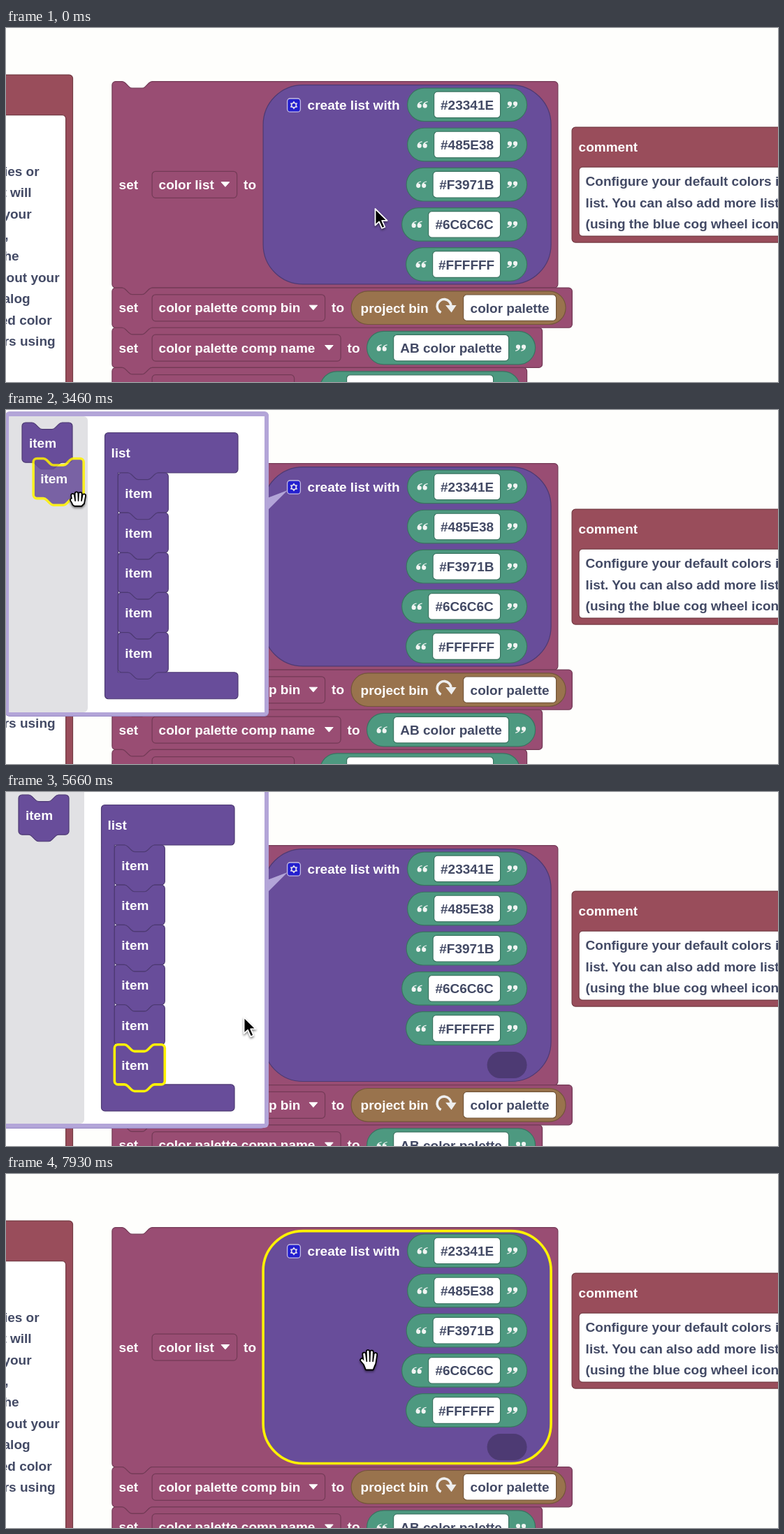
These frames come from a looping animation (1105x507 px, 8 s). An HTML page:

```html
<!DOCTYPE html>
<html lang="en">
<head>
<meta charset="utf-8">
<title>List block mutator</title>
<style>
html, body { margin: 0; width: 100%; height: 100%; overflow: hidden; background: #fefefc; }
svg { display: block; width: 1105px; height: 507px; }
text { font: bold 19px "Liberation Sans", Arial, sans-serif; fill: #fff; }
.ink { fill: #434a65; }
.plum { fill: #994d73; stroke: #733a56; }
.purple { fill: #684d9a; stroke: #4d3a73; }
.green { fill: #4d9980; stroke: #3a7360; }
.brown { fill: #99734d; stroke: #73563a; }
.red { fill: #994d5b; stroke: #733a43; }
.plum, .purple, .green, .brown, .red { stroke-width: 1.2; }
.field { fill: #fff; }
.slot { fill: #4d3a73; }
.mark { fill: #f0f4f2; }
.rim { fill: #b3a5d8; }
.edge { fill: #9686c4; }
.flyout { fill: #e1e1e4; }
.ghost { fill: #c9c9c9; }
.selected { fill: none; stroke: #fff200; stroke-width: 3.6; }
#cursor { filter: drop-shadow(0 2px 1.5px #0007); }
</style>
</head>
<body>
<svg viewBox="0 0 1105 507">
  <defs><clipPath id="inside"><rect id="clipRect"/></clipPath></defs>
  <g id="workspace" transform="translate(-.4 -.4)"></g>
  <g id="icon">
    <rect x="402.6" y="101" width="18.8" height="19.2" rx="4" fill="#1414dc" stroke="#dcd8f4" stroke-width="1.3"/>
    <path id="gear" fill="#fff"/>
    <circle cx="412" cy="110.6" r="2.5" fill="#1414dc"/>
  </g>
  <g id="bubble">
    <g id="frame"></g>
    <g clip-path="url(#inside)">
      <g id="content"></g>
      <g id="dragged"></g>
    </g>
    <circle id="ripple" cx="182" cy="365" fill="none" stroke="#888" stroke-width="3"/>
  </g>
  <g id="cursor"></g>
</svg>
<script>
const LOOP = 8000, ROW = 57.15, GROWTH = 47.6;
const $ = id => document.getElementById(id);

// Shape helpers
const rect = (x, y, w, h, r, cls) =>
  `<rect x="${x}" y="${y}" width="${w}" height="${h}" rx="${r}" class="${cls}"/>`;
const path = (d, cls) => `<path d="${d}" class="${cls}"/>`;
const label = (x, mid, str, cls = '', anchor = 'start') =>
  `<text x="${x}" y="${mid + 6.7}" class="${cls}" text-anchor="${anchor}">${str}</text>`;

const notch = d =>
  `c${2.4 * d} 0 ${3.6 * d} 1.2 ${4.8 * d} 2.4l${4.8 * d} 4.8` +
  `c${1.2 * d} 1.2 ${2.4 * d} 2.4 ${4.8 * d} 2.4h${14.2 * d}` +
  `c${2.4 * d} 0 ${3.6 * d} -1.2 ${4.8 * d} -2.4l${4.8 * d} -4.8` +
  `c${1.2 * d} -1.2 ${2.4 * d} -2.4 ${4.8 * d} -2.4`;
const blockPath = (x, y, w, h) =>
  `M${x} ${y + 5}a5 5 0 0 1 5 -5h9.3${notch(1)}H${x + w - 5}a5 5 0 0 1 5 5V${y + h - 5}` +
  `a5 5 0 0 1 -5 5H${x + 57.3}${notch(-1)}h-9.3a5 5 0 0 1 -5 -5z`;

function quote(x, y, turn) {
  const d = 'M7 0C3 .5 0 3 0 6.4A3.1 3.1 0 1 0 3.1 3.3C3.4 2.2 5 1.5 7 1.2Z';
  return `<g class="mark" transform="translate(${x} ${y}) rotate(${turn}) translate(-7.5 -4.8)">` +
    `<path d="${d}"/><path d="${d}" transform="translate(8 0)"/></g>`;
}
function textPill(left, right, mid, str) {
  return rect(left, mid - 23.8, right - left, 47.6, 23.8, 'green') +
    quote(left + 21.5, mid, 0) + quote(right - 21, mid, 180) +
    rect(left + 38, mid - 18.8, right - left - 76, 37.6, 5, 'green field') +
    label((left + right) / 2, mid + .4, str, 'ink', 'middle');
}
function setter(mid, name, right) {
  return label(162, mid, 'set') + rect(209.5, mid - 19, right - 209.5, 38, 5, 'plum') +
    label(219, mid, name) +
    `<path d="M${right - 22.5} ${mid - 3.6}h11.6l-5.8 6.6z" fill="#fff" stroke="#fff" stroke-linejoin="round"/>` +
    label(right + 9.5, mid, 'to');
}
const item = (x, y, cls = 'purple') => path(blockPath(x, y, 72, ROW), cls) + label(x + 10, y + 29.3, 'item');

function comments() {
  const left = ['libraries or|48', 'it will|37', 'your|37', ',|4', 'the|19', 'without your|77',
    'dialog|35', 'ed color|66', 'colors using|71'];
  const right = ['Configure your default colors in this', 'list. You can also add more list items',
    '(using the blue cog wheel icon)'];
  return rect(-200, 67.5, 295.9, 500, 5, 'red') + rect(-200, 125, 286, 500, 5, 'red field') +
    left.map((line, i) => {
      const [str, x] = line.split('|');
      return label(x, 205.5 + 30.4 * i, str, 'ink', 'end');
    }).join('') +
    rect(810.5, 142.5, 400, 165, 5, 'red') + label(820, 171, 'comment') +
    rect(820.5, 199.5, 400, 99, 5, 'red field') +
    right.map((str, i) => label(830, 220 + 30.4 * i, str, 'ink')).join('');
}

function workspace(grown, selected) {
  const extra = grown ? GROWTH : 0;
  const y = 372.5 + extra;
  const colors = [[575, '#23341E'], [575, '#485E38'], [573.5, '#F3971B'], [567, '#6C6C6C'], [573, '#FFFFFF']];
  const list = cls => rect(368.5, 82, 412, 285.3 + extra, 57, cls);
  return comments() +
    path(blockPath(152.3, 77, 638, 295.5 + extra), 'plum') + setter(224.7 + extra / 2, 'color list', 331) +
    list('purple') + label(432, 111, 'create list with') +
    colors.map(([x, hex], i) => textPill(x, 746, 110.3 + ROW * i, hex)).join('') +
    (grown ? rect(689, 372.5, 57, 38, 19, 'slot') : '') +
    (selected ? list('selected') : '') +
    path(blockPath(152.3, y, 658.5, ROW), 'plum') + setter(y + 28.7, 'color palette comp bin', 457) +
    rect(494.5, y + 4.8, 307, 47.6, 23.8, 'brown') + label(508, y + 29, 'project bin') +
    `<path d="M623 ${y + 35.4}A10 10 0 1 1 637.5 ${y + 26}" fill="none" stroke="#eee" stroke-width="3.6"/>` +
    `<path d="M629.5 ${y + 25}h15.5l-7 10.5z" fill="#eee"/>` +
    rect(655, y + 9.7, 133, 37.6, 5, 'brown field') + label(721.5, y + 28.8, 'color palette', 'ink', 'middle') +
    path(blockPath(152.3, y + ROW, 615.7, ROW), 'plum') +
    setter(y + 86, 'color palette comp name', 479.5) + textPill(517, 758, y + 86, 'AB color palette') +
    path(blockPath(152.3, y + 2 * ROW, 593.7, ROW), 'plum') + setter(y + 143.5, 'color palette tag', 413) +
    textPill(450, 736, y + 143.5, 'color palette');
}

function bubbleFrame(grown) {
  const [x, y, bottom] = grown ? [-6, -12, 481] : [-1, 2, 438];
  return path('M374 126L403 115L374 144z', 'rim') +
    rect(x, y + 1, 377, bottom - y, 6, 'edge') + rect(x, y, 376 - x, bottom - y, 6, 'rim');
}

// "gap" is the slot where the dragged block would land, -1 for none
function bubbleContent(grown, gap) {
  const count = grown || gap >= 0 ? 6 : 5;
  const bottom = 90 + ROW * count;
  const height = grown ? 480 : 424;
  let out = rect(-20, 0, 800, 800, 0, 'field') + rect(-10, 9, 127, height, 6, 'flyout') + item(23, 18) +
    path(`M141.5 37.5a5 5 0 0 1 5 -5H327a5 5 0 0 1 5 5V85a5 5 0 0 1 -5 5H217.6${notch(-1)}H160.3V${bottom}H327` +
      `a5 5 0 0 1 5 5v28a5 5 0 0 1 -5 5H146.5a5 5 0 0 1 -5 -5z`, 'purple') + label(150.5, 61.5, 'list');
  for (let i = 0; i < count; i++) {
    if (i !== gap) out += item(160.3, 90 + ROW * i);
  }
  if (gap >= 0) {
    const y = 90 + ROW * gap;
    out += path(blockPath(160.3, y, 72, ROW), 'ghost') + path(`M160.3 ${y}h14.3${notch(1)}H228`, 'selected');
  }
  if (grown) out += path(blockPath(160.3, 90 + 5 * ROW, 72, ROW), 'selected');
  return out;
}

// Cursors, drawn around the hot spot
function hand(tops, thumb, palm) {
  const fingers = tops.map((top, i) => `M${-6.3 + 5.4 * i} ${top}L${-4.6 + 4.2 * i} 9`).join('');
  const d = `${fingers}M-4 11L${thumb}`;
  const stroke = (color, w) =>
    `<path d="${d}" fill="none" stroke="${color}" stroke-width="${w}" stroke-linecap="round"/>`;
  const body = `M-6 7H9V10L6 ${palm}H-3.5L-6 11z`;
  return `<path d="${body}" stroke="#000" stroke-width="4" stroke-linejoin="round"/>` + stroke('#000', 6.4) +
    stroke('#fff', 2.9) + `<path d="${body}" fill="#fff"/>`;
}
const CURSORS = {
  arrow: '<path d="M.5 1V24.5L6 19.4L10.2 28.8L14.3 27L10.2 17.8H17.6Z" stroke="#fff" stroke-width="1.8" stroke-linejoin="round"/>',
  open: hand([-4, -7.5, -7, -3.5], '-9.5 4.5', 17.5),
  grab: hand([-1.5, -4, -3.5, -1], '-7.5 5', 13)
};

// Monotone Hermite curve through [time, x, y] keys
function follow(keys, t) {
  const last = keys.length - 1;
  if (t <= keys[0][0]) return keys[0].slice(1);
  if (t >= keys[last][0]) return keys[last].slice(1);
  const i = keys.findIndex(key => key[0] > t) - 1;
  const span = keys[i + 1][0] - keys[i][0], u = (t - keys[i][0]) / span;
  return [1, 2].map(axis => {
    const slope = k => k < 0 || k >= last ? 0 :
      (keys[k + 1][axis] - keys[k][axis]) / (keys[k + 1][0] - keys[k][0]);
    const tangent = k => {
      const a = slope(k - 1), b = slope(k);
      return a * b > 0 ? 2 * a * b / (a + b) : 0;
    };
    const p = keys[i][axis], q = keys[i + 1][axis];
    return p + (q - p) * u * u * (3 - 2 * u) +
      span * u * (1 - u) * (tangent(i) * (1 - u) - tangent(i + 1) * u);
  });
}

const POINTER = [
  [730, 528, 258], [1260, 410, 118], [1530, 409, 108], [2360, 409, 108], [2700, 182, 54], [3160, 82, 59],
  [3260, 82, 59], [3900, 204, 389], [4060, 238, 421], [4100, 238, 421], [4330, 217, 421],
  [5130, 217, 421], [5930, 384, 286], [5960, 384, 286], [6430, 407, 131], [6700, 411, 108],
  [7530, 411, 108], [7930, 519, 262]
];
const DRAG = [[3260, 23, 18], [3900, 132, 317], [4060, 179, 380], [4100, 179, 380], [4330, 158, 380]];

const cache = {};
function fill(id, make, ...args) {
  const key = args.join();
  if (cache[id] === key) return;
  cache[id] = key;
  $(id).innerHTML = make(...args);
}
const show = (id, on) => $(id).setAttribute('display', on ? 'inline' : 'none');
const place = (id, x, y) => $(id).setAttribute('transform', `translate(${x} ${y})`);
const set = (id, attrs) => Object.entries(attrs).forEach(([k, v]) => $(id).setAttribute(k, v));
const between = (t, a, b) => t >= a && t < b;

function render(t) {
  const grown = t >= 4660;
  const dragging = between(t, 3160, 4660);
  const gap = between(t, 3830, 3990) ? 4 : between(t, 3990, 4660) ? 5 : -1;
  fill('workspace', workspace, grown, between(t, 1730, 3260) || t >= 7000);

  show('bubble', between(t, 1960, 7060));
  fill('frame', bubbleFrame, grown);
  fill('content', bubbleContent, grown, gap);
  place('content', grown ? -5 : 0, grown ? -14 : 0);
  set('clipRect', grown ? { x: -1, y: -5, width: 371, height: 480 } : { x: 4.5, y: 9, width: 365.5, height: 424 });

  show('dragged', dragging);
  place('dragged', ...follow(DRAG, t));
  $('dragged').setAttribute('opacity', t < 3260 ? 1 : .85);

  const wave = (t - 4725) / 170;
  show('ripple', between(wave, 0, 1));
  set('ripple', { r: Math.max(0, wave * 29), 'stroke-opacity': 1 - wave });

  const [x, y] = follow(POINTER, t);
  const onIcon = between(x, 402, 422) && between(y, 100, 121);
  const onStack = grown && x < 228 && y < 419;
  const overBlock = (x > 376 && !onIcon) || x < 96 || onStack;
  const kind = between(t, 3260, 4660) ? 'grab' : t >= 30 && overBlock ? 'open' : 'arrow';
  fill('cursor', name => CURSORS[name], kind);
  place('cursor', x, y);
  $('icon').setAttribute('opacity', onIcon ? 1 : .8);
}

$('gear').setAttribute('d', 'M' + Array.from({ length: 12 }, (_, i) => {
  const r = i % 2 ? 3.9 : 6, a = i * Math.PI / 6 - Math.PI / 2;
  return `${412 + r * Math.cos(a)} ${110.6 + r * Math.sin(a)}`;
}).join('L') + 'z');
$('dragged').innerHTML = item(0, 0) + path(blockPath(0, 0, 72, ROW), 'selected');

const start = performance.now();
function tick() {
  render((performance.now() - start) % LOOP);
  requestAnimationFrame(tick);
}
tick();
</script>
</body>
</html>
```
